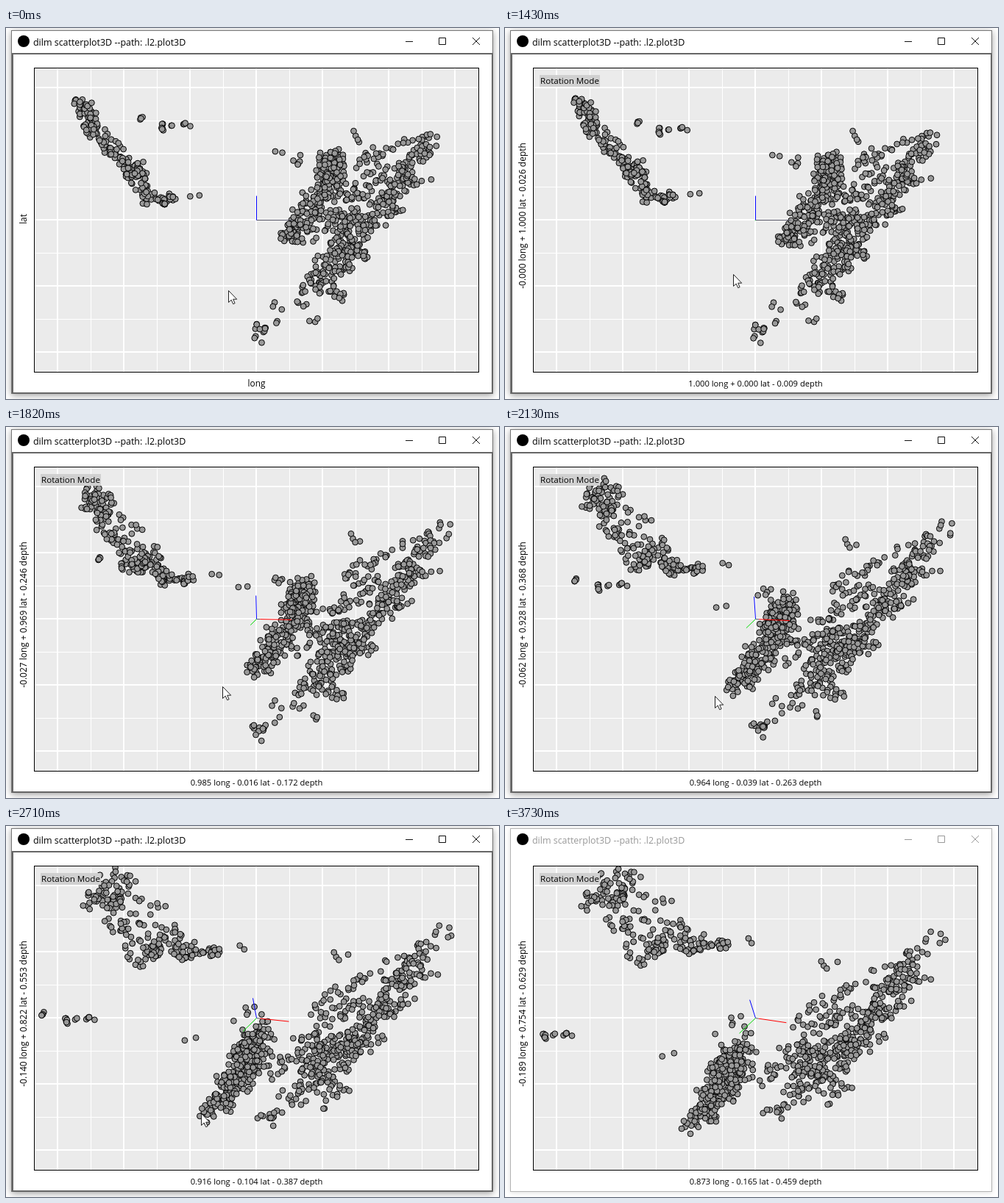
Recreate the animation shown at these times as an HTML page. Size 670 by 505 pixels, loop 3.83 s.

```html
<!DOCTYPE html>
<html lang="en">
<head>
<meta charset="utf-8">
<title>3D scatterplot</title>
<style>
  html, body { margin: 0; width: 100%; height: 100%; overflow: hidden; background: #fff; }
  svg { display: block; font-family: "Open Sans", "Noto Sans", sans-serif; }
  #win { filter: drop-shadow(0 2px 5px #0006); }
  #dots circle { r: 3.9px; fill: #999; stroke: #000; }
  .label { font-size: 11.8px; text-anchor: middle; }
  .off #win { filter: drop-shadow(0 1px 3px #0002); }
  .off #frame { display: none; }
  .off #edge { stroke: #b4b4b4; }
  .off #title { fill: #999; }
  .off #buttons { stroke: #999; }
</style>
</head>
<body>
<svg id="stage" width="670" height="505" viewBox="0 0 670 505">
  <defs><clipPath id="panel"><rect x="39" y="55" width="603" height="413"/></clipPath></defs>
  <g id="win"><rect id="edge" x="7.5" y="3.5" width="654" height="494" fill="#fff" stroke="#777"/></g>
  <rect id="frame" x="9" y="35" width="652" height="462" fill="none" stroke="#666" stroke-width="2"/>
  <circle cx="24" cy="18" r="8"/>
  <text id="title" x="37" y="23.5" font-size="12.45">dilm scatterplot3D --path: .l2.plot3D</text>
  <path id="buttons" d="M543 18.5h10M588.5 13.5h9v9h-9zM634 13l10 10m0-10l-10 10" fill="none" stroke="#111"/>
  <rect x="38.5" y="54.5" width="604" height="414" fill="#ebebeb"/>
  <path id="minor" stroke="#fff"/>
  <path id="major" stroke="#fff" stroke-width="2"/>
  <g clip-path="url(#panel)">
    <g id="dots"></g>
    <g id="axes"></g>
  </g>
  <rect x="38.5" y="54.5" width="604" height="414" fill="none" stroke="#000"/>
  <g id="mode">
    <rect x="47" y="64" width="82" height="16" fill="#d0d0d0"/>
    <text x="48" y="76" font-size="11.6">Rotation Mode</text>
  </g>
  <text id="xLabel" class="label" x="340.5" y="488"></text>
  <text id="yLabel" class="label"></text>
  <path id="mouse" d="M.5.5v16l3.7-3.4 2.5 5.6 2.4-1-2.4-5.5h5z" fill="#fff" stroke="#222"/>
</svg>
<script>
const $ = id => document.getElementById(id);
const LOOP = 3830, STEP = 150, CX = 340, CY = 261, SX = 48, SY = 33;

let seed = 11;
const rand = () => (seed = (seed * 16807) % 2147483647) / 2147483647;
const bell = () => 2 * (rand() + rand() + rand()) - 3;
const mix = (a, b, k) => a + (b - a) * k;
const blend = (a, b, k) => a.map((v, i) => mix(v, b[i], k));
const add = (parent, tag) =>
  parent.appendChild(document.createElementNS("http://www.w3.org/2000/svg", tag));
const set = (el, attrs) => { for (const k in attrs) el.setAttribute(k, attrs[k]); };

function along(path, s) {
  const u = s * (path.length - 1), i = Math.min(Math.floor(u), path.length - 2);
  return blend(path[i], path[i + 1], u - i);
}

// Scatters small bursts of points over the sheet between two edges of [x, y, depth]
const points = [];
function slab(n, spread, edgeA, edgeB, skew = 1, across = rand) {
  for (let left = n; left > 0;) {
    const s = rand() ** skew, k = across();
    const centre = blend(along(edgeA, s), along(edgeB, s), k);
    const nudge = (p, r) => [p[0] + r * bell(), p[1] + r * bell(), p[2] + r * .05 * bell()];
    const spot = nudge(centre, spread);
    for (let m = Math.ceil(rand() * 4); m > 0 && left > 0; m--, left--) {
      const [x, y, depth] = nudge(spot, spread * .8);
      points.push({
        pos: [(x - CX) / SX, (CY - y) / SY, depth],
        dot: add($("dots"), "circle")
      });
    }
  }
}

// Long island arc in the west, its thin tail and the deep chain above it
slab(215, 4.5,
  [[96, 94, -3], [125, 130, -2.6], [182, 205, -2.6], [205, 236, -3]],
  [[103, 110, -.2], [124, 152, -1.3], [166, 190, -.2], [192, 232, -2.5]]);
slab(26, 3,
  [[200, 239, -3], [258, 237, -3.2], [286, 203, -3.4]],
  [[215, 232, -2.8], [240, 236, -3.2], [265, 219, -3.3]], 1.6);
slab(18, 1.5,
  [[168, 117, 6.8], [197, 130, 6.7], [265, 133, 6.4]],
  [[180, 115, 6.8], [213, 140, 6.6], [240, 124, 6.3]]);

// Dipping sheet in the east: crowded along its deep edge and its shallow half
slab(630, 6,
  [[586, 150, -3], [560, 202, -2.5], [518, 245, -1.6], [490, 298, -.8]],
  [[432, 176, 5.4], [432, 215, 5.4], [398, 262, 5.6], [373, 281, 6.3]], 1.35,
  () => rand() < .45 ? mix(.85, 1, rand()) : .6 * rand() ** 1.2);
slab(180, 5,
  [[450, 298, .5], [422, 334, .8], [402, 360, 1.1], [315, 433, .3]],
  [[492, 290, -1.2], [462, 328, -.2], [456, 362, 0], [350, 420, .2]], 1.7);
slab(14, 6,
  [[343, 174, 6.2], [385, 202, 5]],
  [[400, 172, 4.5], [490, 153, -1]]);

const grid = first => {
  let d = "";
  for (let x = first; x < 642; x += 90) d += `M${x} 55V468`;
  for (let y = first + 11; y < 468; y += 90) d += `M39 ${y}H642`;
  return d;
};
set($("major"), { d: grid(70) });
set($("minor"), { d: grid(115.5) });

const [greyAxis, redAxis, blueAxis, greenAxis] = ["#556", "#f00", "#00f", "#0d0"].map(stroke => {
  const line = add($("axes"), "line");
  set(line, { stroke });
  return line;
});

// Drag path: time, rotation vector, pointer
const flat = [0, 0, 0], turned = [.72507, -.521, -.01376];
const keys = [
  { at: 0, spin: flat, mouse: [302, 357] },
  { at: 709, spin: flat, mouse: [302, 357] },
  { at: 710, spin: flat, mouse: [328, 315] },
  { at: 860, spin: flat, mouse: [328, 301] },
  { at: 1010, spin: flat, mouse: [328, 305] },
  { at: 1280, spin: flat, mouse: [318, 325] },
  { at: 1430, spin: [.026, -.009, -.0003], mouse: [310, 335] },
  { at: 1580, spin: [.15, -.1, -.002], mouse: [301, 343] },
  { at: 1820, spin: [.25, -.174, -.006], mouse: [294, 353] },
  { at: 2130, spin: [.38342, -.2705, -.01193], mouse: [285, 366] },
  { at: 2710, spin: [.6108, -.41851, -.01976], mouse: [265, 391] },
  { at: 2970, spin: turned, mouse: [286, 396] },
  { at: 3090, spin: turned, mouse: [473, 442] },
  { at: 3480, spin: turned, mouse: [680, 520] }
];

// The screen refreshes on each key and every STEP after it
function stateAt(t) {
  const i = keys.findLastIndex(k => k.at <= t), a = keys[i], b = keys[i + 1] || a;
  const shown = Math.floor((t - a.at) / STEP) * STEP;
  const k = shown / (b.at - a.at || 1);
  return { spin: blend(a.spin, b.spin, k), mouse: blend(a.mouse, b.mouse, k) };
}

// First two rows of the rotation matrix
function turn([x, y, z]) {
  const a = Math.hypot(x, y, z) || 1e-9;
  const s = Math.sin(a) / a, c = (1 - Math.cos(a)) / (a * a);
  return [
    [1 - c * (y * y + z * z), c * x * y - s * z, c * x * z + s * y],
    [c * x * y + s * z, 1 - c * (x * x + z * z), c * y * z - s * x]
  ];
}

const dot3 = (a, b) => a[0] * b[0] + a[1] * b[1] + a[2] * b[2];
const signed = v => (v < 0 ? "- " : "+ ") + Math.abs(v).toFixed(3);
const formula = ([a, b, c]) => `${a.toFixed(3)} long ${signed(b)} lat ${signed(c)} depth`;

function drawLabels(t) {
  const plain = t < 1280;
  // The labels catch up with the points late
  const [rx, ry] = turn(stateAt(t < 1700 ? 1430 : t).spin);
  $("xLabel").textContent = plain ? "long" : formula(rx);
  $("yLabel").textContent = plain ? "lat" : formula(ry);
  $("xLabel").style.fontSize = plain ? "" : "11.2px";
  $("yLabel").style.fontSize = plain ? "" : "11.95px";
  set($("yLabel"), { transform: `translate(28 ${plain ? 260 : 255.5}) rotate(-90)` });
}

function draw(t) {
  const { spin, mouse } = stateAt(t), [rx, ry] = turn(spin);
  const project = p => [CX + SX * dot3(rx, p), CY - SY * dot3(ry, p)];
  for (const { pos, dot } of points) {
    const [cx, cy] = project(pos);
    set(dot, { cx: cx.toFixed(1), cy: cy.toFixed(1) });
  }
  const axis = (line, from, to) => {
    const [x1, y1] = project(from), [x2, y2] = project(to);
    set(line, { x1: x1 + .5, y1: y1 + .5, x2: x2 + .5, y2: y2 + .5 });
  };
  const redStart = t < 1580 ? 1 : t < 1700 ? .55 : .1;
  axis(greyAxis, [0, 0, 0], [redStart, 0, 0]);
  axis(redAxis, [redStart, 0, 0], [1, 0, 0]);
  axis(blueAxis, [0, 0, 0], [0, 1, 0]);
  axis(greenAxis, [0, 0, 0], [0, 0, 1]);
  drawLabels(t);
  $("mode").style.display = t < 440 ? "none" : "";
  set($("mouse"), { transform: `translate(${mouse.map(Math.round)})` });
  $("stage").classList.toggle("off", t >= 3730);
}

const start = performance.now();
function frame() {
  draw((performance.now() - start) % LOOP);
  requestAnimationFrame(frame);
}
frame();
</script>
</body>
</html>
```
